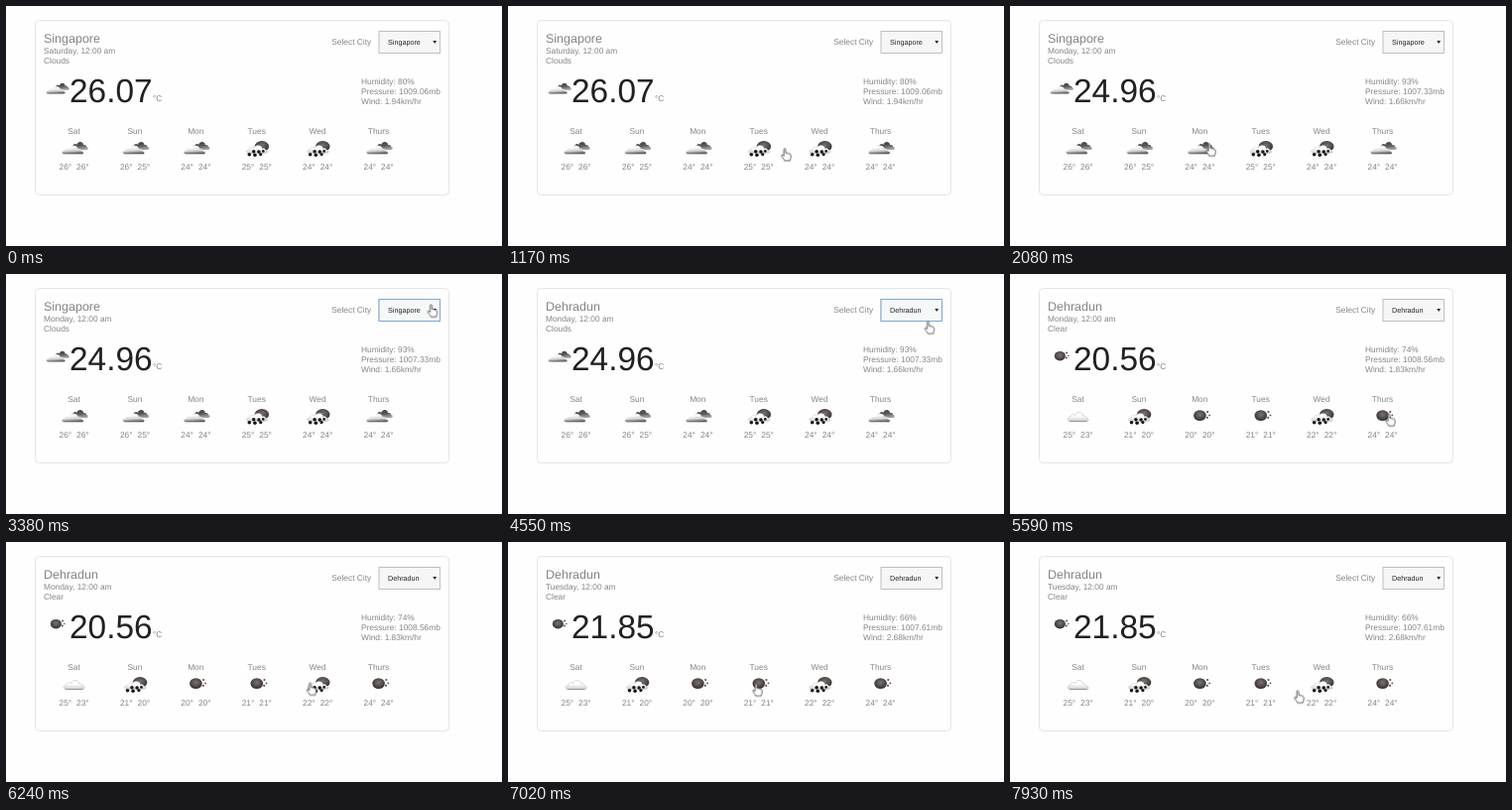
These frames come from a looping animation (500x242 px, 8 s). An HTML page:

```html
<!DOCTYPE html>
<html lang="en">
<head>
<meta charset="utf-8">
<title>Weather card</title>
<style>
  html, body { margin: 0; width: 100%; height: 100%; overflow: hidden; background: #fefefe; }
  svg { display: block; width: 500px; height: 242px; }
  text { font: 8.36px "Liberation Sans", Arial, sans-serif; fill: #858585; text-rendering: geometricPrecision; white-space: pre; }
  .city { font-size: 12.5px; }
  .temp { font-size: 33.4px; fill: #212121; }
  .option { font-size: 7.2px; fill: #222; }
  .mid { text-anchor: middle; }

  /* every layer shares one 8 s clock */
  .show { opacity: 0; animation: 8s step-end -10ms infinite; }
  .city-1 { animation-name: city1; }
  .city-2 { animation-name: city2; }
  .now-1 { animation-name: now1; }
  .now-2 { animation-name: now2; }
  .now-3 { animation-name: now3; }
  .now-4 { animation-name: now4; }
  .week-1 { animation-name: week1; }
  .week-2 { animation-name: week2; }
  .focus { animation-name: focus; }
  @keyframes city1 { 0% { opacity: 1 } 56.875%, 100% { opacity: 0 } }
  @keyframes city2 { 0% { opacity: 0 } 56.875%, 100% { opacity: 1 } }
  @keyframes now1 { 0% { opacity: 1 } 26%, 100% { opacity: 0 } }
  @keyframes now2 { 0% { opacity: 0 } 26% { opacity: 1 } 63.375%, 100% { opacity: 0 } }
  @keyframes now3 { 0% { opacity: 0 } 63.375% { opacity: 1 } 87.75%, 100% { opacity: 0 } }
  @keyframes now4 { 0% { opacity: 0 } 87.75%, 100% { opacity: 1 } }
  @keyframes week1 { 0% { opacity: 1 } 63.375%, 100% { opacity: 0 } }
  @keyframes week2 { 0% { opacity: 0 } 63.375%, 100% { opacity: 1 } }
  @keyframes focus { 0% { opacity: 0 } 42.25% { opacity: 1 } 69.875%, 100% { opacity: 0 } }

  .pointer { animation: travel 8s step-end -10ms infinite, appear 8s step-end -10ms infinite; }
  @keyframes appear { 0% { opacity: 0 } 13%, 100% { opacity: 1 } }
  @keyframes travel {
    0% { transform: translate(300px, 151px); }
    13% { transform: translate(300px, 151px); animation-timing-function: steps(5); }
    21.125% { transform: translate(202.5px, 145px); }
    26% { transform: translate(202.5px, 145px); animation-timing-function: steps(6); }
    35.75% { transform: translate(416px, 43px); animation-timing-function: steps(2); }
    39% { transform: translate(430px, 37px); }
    56.875% { transform: translate(425px, 54px); }
    61.75% { transform: translate(425px, 54px); animation-timing-function: steps(5); }
    69.875% { transform: translate(383.5px, 147px); }
    71.5% { transform: translate(383.5px, 147px); animation-timing-function: steps(7); }
    82.875% { transform: translate(251.5px, 149px); }
    87.75% { transform: translate(251.5px, 149px); animation-timing-function: steps(7); }
    99.125%, 100% { transform: translate(291.5px, 156px); }
  }
</style>
</head>
<body>
<svg viewBox="0 0 500 242">
  <defs>
    <linearGradient id="light" x2="0.15" y2="1">
      <stop offset="0.25" stop-color="#fbfbfb"/>
      <stop offset="0.65" stop-color="#d4d4d4"/>
      <stop offset="1" stop-color="#555"/>
    </linearGradient>
    <linearGradient id="pale" x2="0" y2="1">
      <stop offset="0.4" stop-color="#fff"/>
      <stop offset="1" stop-color="#cfcbc8"/>
    </linearGradient>
    <linearGradient id="dark" x2="0.3" y2="1">
      <stop offset="0" stop-color="#3a3a3a"/>
      <stop offset="0.6" stop-color="#5a5a5a"/>
      <stop offset="1" stop-color="#a0a0a0"/>
    </linearGradient>
    <radialGradient id="moon" cx="0.5" cy="0.42" r="0.6">
      <stop offset="0" stop-color="#7a7370"/>
      <stop offset="0.55" stop-color="#544e4c"/>
      <stop offset="1" stop-color="#2e2a29"/>
    </radialGradient>

    <path id="puff" d="M-9 4.5C-12.5 4.5-12.5 .8-9 .6C-8.4-2.2-5-2.6-3.9-1C-2.4-5.2 4-4.8 4.6-.6C7-1.2 8.4.2 8.2 1.2C11 1.4 11 4.5 8.4 4.5Z"/>
    <g id="clouds">
      <use href="#puff" transform="translate(5.4 -2.2) scale(.8 .95)" fill="url(#dark)"/>
      <use href="#puff" transform="translate(-1.2 2)" fill="url(#light)" stroke="#fff" stroke-width=".4"/>
    </g>
    <g id="rain">
      <ellipse cx="4.6" cy="-1.6" rx="7.2" ry="5.3" fill="url(#moon)"/>
      <use href="#puff" transform="translate(.4 1.2) scale(.98 .95)" fill="url(#pale)" stroke="#bbb" stroke-width=".4"/>
      <g fill="#141414">
        <circle cx="-8" cy="6.8" r="1.8"/><circle cx="-3.6" cy="3.8" r="1.7"/>
        <circle cx="-2.4" cy="7.2" r="1.8"/><circle cx="1.6" cy="4" r="1.7"/>
        <circle cx="3.4" cy="6.6" r="1.6"/><circle cx="6" cy="3.4" r="1.3"/>
      </g>
    </g>
    <g id="cloud">
      <use href="#puff" transform="translate(.2 .8) scale(.95 1.1)" fill="url(#pale)" stroke="#c4bfbc" stroke-width=".6"/>
      <path d="M-9 5.5H8.2" stroke="#8f8884" stroke-width=".8"/>
    </g>
    <g id="clear">
      <ellipse cx="-.5" cy="-.4" rx="6.3" ry="5.4" fill="url(#moon)"/>
      <g fill="#5a5452">
        <circle cx="7.2" cy="-4" r="1.1"/><circle cx="9.2" cy="-.6" r=".9"/><circle cx="6.9" cy="1.8" r="1.1"/>
      </g>
    </g>
  </defs>

  <rect width="500" height="242" fill="#fefefe"/>
  <rect x="29.5" y="14.5" width="417" height="176" rx="4" fill="#fefefe" stroke="#e4e4e4"/>

  <text x="328.3" y="39.3">Select City</text>
  <rect x="376" y="25.5" width="61.5" height="22" fill="#f6f6f6" stroke="#b9b9b9" stroke-width=".9"/>
  <rect class="show focus" x="376" y="25.5" width="61.5" height="22" fill="#f6f7f8" stroke="#7fa6cf"/>
  <path d="M430.3 35H434.1L432.2 38Z" fill="#222"/>
  <text x="148" y="96.3">°C</text>

  <g id="layers"></g>

  <g class="pointer">
    <path transform="scale(.95)" fill="#fff" stroke="#333" stroke-width=".8" stroke-linejoin="round"
      d="M-2.6 1.6V-5.2C-2.6-6.8-.6-6.8-.6-5.2V-1.4C-.2-2.2 1.2-2 1.3-1C1.8-1.7 3-1.3 3.1-.4C3.8-.9 4.8-.4 4.8.6V3.2C4.8 4.6 3.8 5 3.8 6.6H-1.8C-2 5.2-4.2 3.4-4.9 1.6C-5.3.4-4-.1-3.3.7Z"/>
  </g>
</svg>
<script>
  const text = (x, y, s, cls = "") => `<text x="${x}" y="${y}" class="${cls}">${s}</text>`;
  const icon = (name, x, y, k = 1) => `<use href="#${name}" transform="translate(${x} ${y}) scale(${k})"/>`;
  const layer = (cls, ...parts) => `<g class="show ${cls}">${parts.join("")}</g>`;

  const days = ["Sat", "Sun", "Mon", "Tues", "Wed", "Thurs"];
  const colX = i => 68.5 + 61.4 * i;

  const city = (cls, name) => layer(cls, text(38, 37, name, "city"), text(385, 39, name, "option"));

  const now = (cls, day, sky, shape, temp, humidity, pressure, wind) => layer(cls,
    text(38, 48, `${day}, 12:00 am`),
    text(38, 58.3, sky),
    icon(shape, shape === "clear" ? 50.8 : 51.8, 83, 0.88),
    text(64, 97, temp, "temp"),
    text(358, 78.6, `Humidity: ${humidity}%`),
    text(358, 88.8, `Pressure: ${pressure}mb`),
    text(358, 98.6, `Wind: ${wind}km/hr`));

  const week = (cls, shapes, highs, lows) => layer(cls, ...shapes.map((shape, i) =>
    icon(shape, colX(i) + 0.6, 143) +
    text(colX(i) - 15, 165, highs[i] + "°") +
    text(colX(i) + 2.6, 165, lows[i] + "°")));

  document.getElementById("layers").innerHTML = [
    ...days.map((d, i) => text(colX(i), 129.3, d, "mid")),
    city("city-1", "Singapore"),
    city("city-2", "Dehradun"),
    now("now-1", "Saturday", "Clouds", "clouds", "26.07", 80, "1009.06", "1.94"),
    now("now-2", "Monday", "Clouds", "clouds", "24.96", 93, "1007.33", "1.66"),
    now("now-3", "Monday", "Clear", "clear", "20.56", 74, "1008.56", "1.83"),
    now("now-4", "Tuesday", "Clear", "clear", "21.85", 66, "1007.61", "2.68"),
    week("week-1", ["clouds", "clouds", "clouds", "rain", "rain", "clouds"],
      [26, 26, 24, 25, 24, 24], [26, 25, 24, 25, 24, 24]),
    week("week-2", ["cloud", "rain", "clear", "clear", "rain", "clear"],
      [25, 21, 20, 21, 22, 24], [23, 20, 20, 21, 22, 24])
  ].join("");
</script>
</body>
</html>
```
